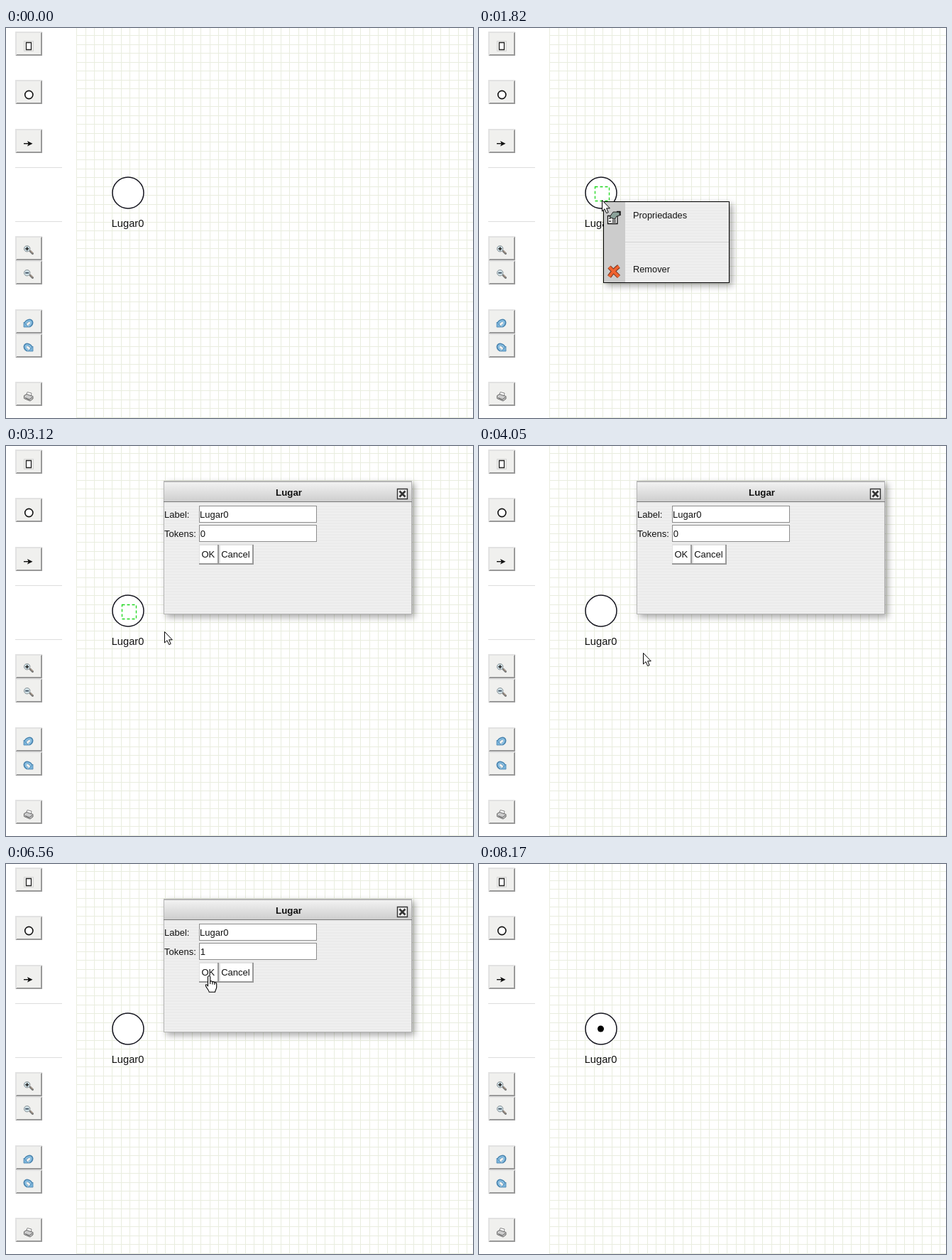
An HTML page that plays this animation: 658x549 px, repeating every 9360 ms.

```html
<!DOCTYPE html>
<html lang="pt">
<head>
<meta charset="utf-8">
<title>Lugar</title>
<style>
html, body { margin: 0; width: 100%; height: 100%; overflow: hidden; background: #fff; }
svg { display: block; width: 658px; height: 549px; }
text { font: 13px "Liberation Sans", Arial, sans-serif; fill: #111; }
.menu { font-size: 12.8px; }
.name { font-size: 14.67px; text-anchor: middle; }
.title { font-size: 13.3px; font-weight: bold; text-anchor: middle; }
.shadow { filter: drop-shadow(4px 4px 5px rgba(0, 0, 0, .35)); }
.crisp { shape-rendering: crispEdges; }
</style>
</head>
<body>
<svg viewBox="0 0 658 549">
  <defs>
    <pattern id="grid" x="99" y="10" width="25" height="25" patternUnits="userSpaceOnUse">
      <path class="crisp" d="M0 .5H25M0 13.5H25M.5 0V25M13.5 0V25" stroke="#e9eddf"/>
    </pattern>
    <pattern id="stripes" width="4" height="4" patternUnits="userSpaceOnUse">
      <path class="crisp" d="M0 0H4V4H0Z" fill="#efefef"/>
      <path class="crisp" d="M0 0H4V2H0Z" fill="#ebebeb"/>
    </pattern>
    <linearGradient id="bar" x2="0" y2="1">
      <stop stop-color="#f2f2f2"/><stop offset="1" stop-color="#cecece"/>
    </linearGradient>
    <g id="button" class="crisp">
      <path d="M0 0H38V34H0Z" fill="#e2e2e2"/>
      <path d="M38 0V34H0L2 32H36V2Z" fill="#999"/>
      <path d="M2 2H36V32H2Z" fill="#f0f0ee"/>
    </g>
    <g id="lens">
      <path d="M21 21L24.5 24.5" stroke="#777" stroke-width="3" stroke-linecap="round"/>
      <path d="M21.5 20.7L24.5 23.7" stroke="#c9a98a"/>
      <circle cx="16.7" cy="17.7" r="4.2" fill="#cfe0e6" stroke="#8a9296"/>
    </g>
    <g id="turn">
      <path d="M14 22C14 16 23 13 23.5 18.5C23.5 21 21.5 23 19 24" fill="none" stroke="#4c86b0" stroke-width="4"/>
      <path d="M14.5 21C15 16 22.5 14.5 22.7 18.5C22.5 21 21 22.5 19 23.5" fill="none" stroke="#8fc4e6" stroke-width="2"/>
      <path d="M12 18V25H19Z" fill="#79b3da" stroke="#4c86b0" stroke-width=".8"/>
    </g>
  </defs>

  <path d="M99 0H658V549H99Z" fill="url(#grid)"/>
  <path class="crisp" d="M13 196.5H79M13 272.5H79" stroke="#ddd"/>
  <g id="tools"></g>

  <circle cx="172" cy="232" r="22" fill="#fff" stroke="#15151f" stroke-width="1.5"/>
  <circle id="token" cx="171.5" cy="232" r="4.5"/>
  <text class="name" x="171.5" y="280">Lugar0</text>
  <path id="focus" d="M163.5 223.5H183.5V243.5H163.5Z" fill="none" stroke="#1ed81e" stroke-width="1.3" stroke-dasharray="4 3"/>

  <g id="menu">
    <path class="shadow" d="M175 244H353V359H175Z"/>
    <g class="crisp">
      <path d="M176 245H352V358H176Z" fill="url(#stripes)"/>
      <path d="M176 245H206V358H176Z" fill="#ccc"/>
      <path d="M206 301.5H352" stroke="#d5d5d5"/>
      <path id="hover" d="M206 246H352V281H206Z" fill="#006"/>
    </g>
    <path d="M181.5 264.5H195V275.5H181.5Z" fill="#fff" stroke="#111" stroke-width="1.3"/>
    <path d="M183 268H186M183 272H186M187.5 268H193M187.5 270.5H193M187.5 273H193" stroke="#333" stroke-width="1.3"/>
    <path d="M184 266L189 259H198V264L194 265L191 269Z" fill="#8ba29a" stroke="#222"/>
    <path d="M194 258.5H199V264" fill="none" stroke="#111" stroke-width="1.5"/>
    <path d="M183.5 336.5C188 341 193 346 197 350M197 335.5C191 340 187 345 183.5 350" fill="none" stroke="#7b3a24" stroke-width="6"/>
    <path d="M183.5 336.5C188 341 193 346 197 350M197 335.5C191 340 187 345 183.5 350" fill="none" stroke="#f0622f" stroke-width="4"/>
    <text id="item" class="menu" x="217" y="268">Propriedades</text>
    <text class="menu" x="217" y="344">Remover</text>
  </g>

  <g id="dialog">
    <path class="shadow" d="M222 49H572V237H222Z" fill="#b5b5b5"/>
    <path class="crisp" d="M223 79H571V236H223Z" fill="url(#stripes)"/>
    <path class="crisp" d="M223 51H571V78H223Z" fill="url(#bar)"/>
    <path class="crisp" d="M222 78.5H572" stroke="#777"/>
    <text class="title" x="398.5" y="70">Lugar</text>
    <path d="M551.5 60.5H565.5V74.5H551.5Z" fill="#eee" stroke="#333" stroke-width="1.4"/>
    <path d="M554.5 63.5L562.5 71.5M562.5 63.5L554.5 71.5" stroke="#333" stroke-width="2.6"/>
    <g class="crisp">
      <path d="M272.5 84.5H437.5V107.5H272.5ZM272.5 111.5H437.5V134.5H272.5Z" fill="#fff" stroke="#8c8c8c"/>
      <path d="M272 138H349V167H272Z" fill="#e0e0e0"/>
      <path d="M298 139H300V167H272V165H298ZM347 139H349V167H300V165H347Z" fill="#999"/>
      <path d="M273 140H298V165H273ZM302 140H347V165H302Z" fill="#fff"/>
      <path id="marked" d="M274 116H281V131H274Z" fill="#39f"/>
      <path id="caret" d="M281.5 116V131" stroke="#000"/>
    </g>
    <text x="223" y="101">Label:</text>
    <text x="223" y="128">Tokens:</text>
    <text x="273" y="101">Lugar0</text>
    <text id="count" x="273.7" y="128">0</text>
    <text x="275.5" y="157">OK</text>
    <text x="303.2" y="157">Cancel</text>
  </g>

  <g id="cursor" stroke-linejoin="round">
    <path id="arrow" d="M.5 .5V16L4 12.7L6.7 18.6L9.2 17.5L6.6 11.8H11.3Z" fill="#fff" stroke="#000"/>
    <path id="beam" d="M-3.5 -6.5H-1L0 -5.5L1 -6.5H3.5M0 -5.5V6M-3.5 7H-1L0 6L1 7H3.5" fill="none" stroke="#000" stroke-width="1.3"/>
    <path id="hand" d="M-1.5 15V2C-1.5 0 1.7 0 1.7 2V8.5C2.3 7.4 4.7 7.6 4.9 9.3C5.6 8.2 7.7 8.6 7.9 10.2C9 9.4 10.7 10 10.7 11.8V16.5C10.7 19 8.8 20.5 8.6 23.3H.2C0 20.5-2.5 19.2-4.5 14.8C-5.4 12.6-3 11.5-1.5 15ZM1.7 8.5V12M4.9 9.3V12.5M7.9 10.2V13" fill="#fff" stroke="#000" stroke-width="1.1"/>
  </g>
  <circle id="click" r="15" fill="#ff0" opacity=".5"/>
</svg>
<script>
const LOOP = 9360;
const $ = id => document.getElementById(id);
const show = (id, on) => $(id).setAttribute('visibility', on ? 'inherit' : 'hidden');
const place = (id, x, y) => $(id).setAttribute('transform', `translate(${x} ${y})`);

// Toolbar: top edge and icon, drawn relative to the button
const tools = [
  [5, `<path d="M12.5 13.5H25.5V27.5H12.5Z" fill="none" stroke="#bbb" stroke-dasharray="1 1"/>
       <path d="M15.5 15.5H22.5V25.5H15.5Z" fill="#fff" stroke="#222" stroke-width="1.3"/>`],
  [73, '<circle cx="19.3" cy="21" r="5.6" fill="#fff" stroke="#111" stroke-width="1.6"/>'],
  [142, '<path d="M12 20.7H20" stroke="#111" stroke-width="1.4"/><path d="M17 17L24.5 20.7L17 24.4L18.7 20.7Z" fill="#111"/>'],
  [293, '<use href="#lens"/><path d="M14.2 17.7H19.2M16.7 15.2V20.2" stroke="#222" stroke-width="1.6"/>'],
  [327, '<use href="#lens"/><path d="M14.2 17.7H19.2" stroke="#345" stroke-width="1.6"/>'],
  [396, '<use href="#turn"/>'],
  [430, '<use href="#turn" transform="matrix(-1 0 0 1 37 0)"/>'],
  [498, `<path d="M15 20L17 14.5L23 16L22 21Z" fill="#fff" stroke="#888"/>
         <path d="M12.5 19.5L16 17.5L25 20.5V24L21 27L12.5 23.5Z" fill="#ccc" stroke="#666"/>
         <path d="M14 22.5L20 25L24 22" fill="none" stroke="#555"/>`]
];
$('tools').innerHTML = tools.map(([y, icon]) =>
  `<g transform="translate(13 ${y})"><use href="#button"/>${icon}</g>`).join('');

const slow = p => p * (2 - p), fast = p => p * p, smooth = p => p * p * (3 - 2 * p);

// Pointer moves: first step, last step, number of steps, from, to, easing
const moves = [
  [630, 1170, 8, [365, 592], [173, 242], slow],
  [2050, 2220, 3, [173, 242], [223, 261], smooth],
  [3350, 3500, 3, [223, 261], [231, 291], smooth],
  [4130, 4670, 8, [231, 291], [303, 126], smooth],
  [6240, 6560, 5, [303, 126], [286, 157], smooth],
  [7290, 7290, 1, [286, 157], [285, 157], smooth],
  [7770, 8170, 6, [285, 157], [520, 691], fast]
];
const clicks = [[1650, 1820], [2870, 3020], [5000, 5080], [5230, 5310], [7140, 7220]];

function pointer(t) {
  const [start, end, steps, from, to, ease] = moves.findLast(m => t >= m[0]) || moves[0];
  if (t < start) return from;
  const k = Math.min(steps - 1, Math.floor((t - start) / (end - start || 1) * (steps - 1) + .01));
  const p = ease((k + 1) / steps);
  return from.map((v, i) => Math.round(v + (to[i] - v) * p));
}

function draw(t) {
  const within = (a, b) => t >= a && t < b;
  const [x, y] = pointer(t);
  const hover = within(2130, 3020), dialog = within(3120, 7290);
  const beam = dialog && x >= 272 && y > 110 && y < 136;
  const hand = hover || dialog && x >= 272 && y > 137 && y < 167;

  show('menu', within(1820, 3020));
  show('hover', hover);
  $('item').style.fill = hover ? '#fff' : '#111';
  show('focus', within(1820, 3900));
  show('dialog', dialog);
  show('marked', dialog && within(5230, 6070));
  show('caret', within(5000, 5230) || within(6070, 6560));
  $('count').textContent = t < 6070 ? '0' : '1';
  $('count').style.fill = within(5230, 6070) ? '#fff' : '#111';
  show('token', t >= 7370);

  show('beam', beam);
  show('hand', hand);
  show('arrow', !beam && !hand);
  place('cursor', x, y);
  show('click', clicks.some(c => within(...c)));
  place('click', beam ? x - 2 : x, beam ? y - 1 : y);
}

const begin = performance.now();
function tick() {
  draw((performance.now() - begin) % LOOP);
  requestAnimationFrame(tick);
}
tick();
</script>
</body>
</html>
```
